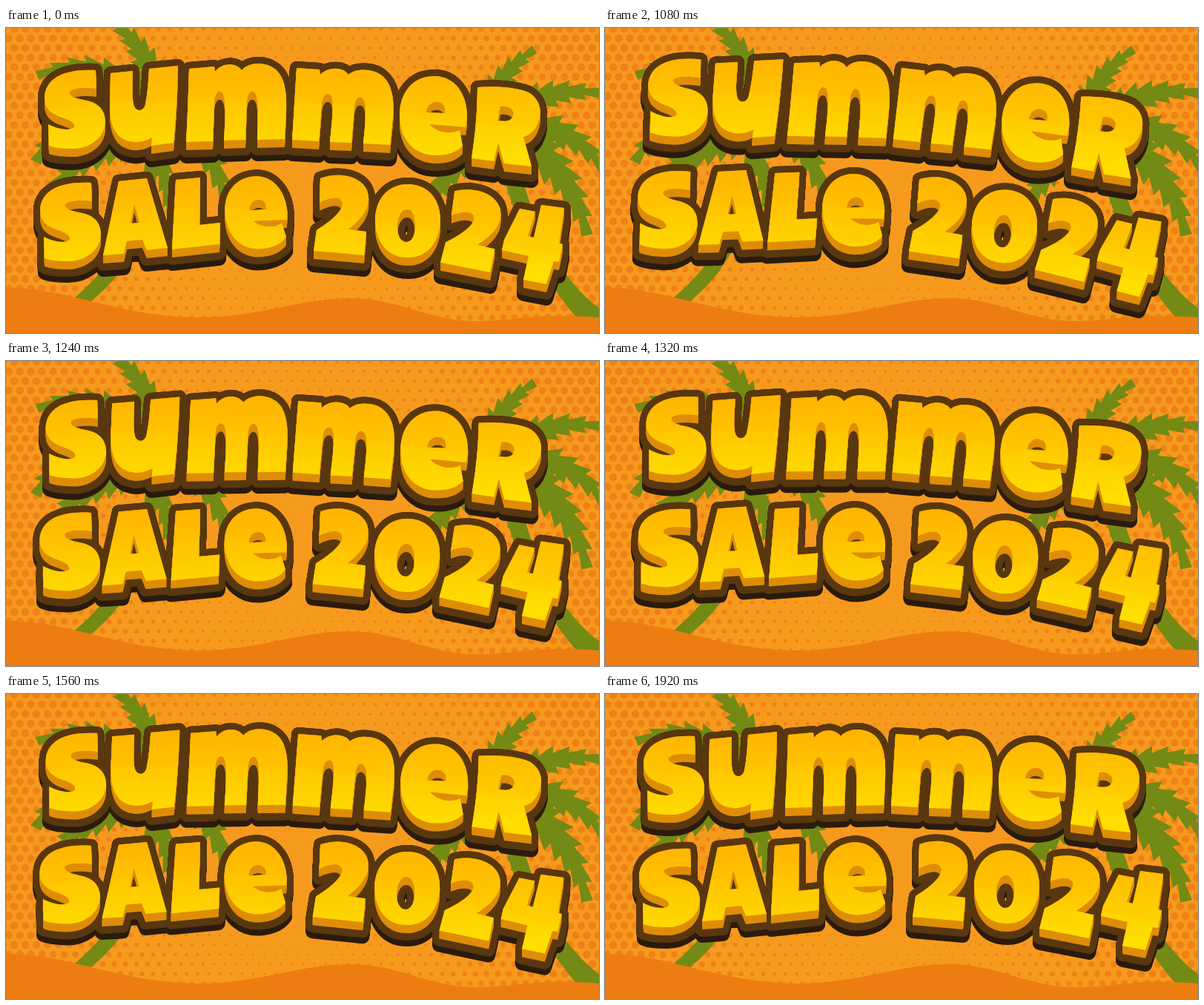
An HTML page with a canvas for the animation above (1960 ms loop, 800 by 412 pixels).

```html
<!DOCTYPE html>
<html lang="en">
<head>
<meta charset="utf-8">
<title>Summer Sale 2024</title>
<style>
html, body { margin: 0; width: 100%; height: 100%; overflow: hidden; background: #f69a1e; }
canvas { position: absolute; left: 0; top: 0; }
</style>
</head>
<body>
<canvas id="back" width="800" height="412"></canvas>
<canvas id="front" width="800" height="412" role="img" aria-label="Summer Sale 2024"></canvas>
<script>
const back = document.getElementById('back').getContext('2d');
const front = document.getElementById('front').getContext('2d');

// ---------- scenery ----------
function halftone() {
  back.fillStyle = '#f69a1e';
  back.fillRect(0, 0, 800, 412);
  back.fillStyle = '#ef8118';
  for (let row = 0; row < 34; row++) {
    for (let col = 0; col < 56; col++) {
      const x = col * 15 + (row % 2) * 7.5 - 4, y = row * 13 + 1;
      const r = (Math.hypot(x - 400, y - 206) - 70) * 0.016;
      if (r < 0.5) continue;
      back.beginPath();
      back.arc(x, y, Math.min(r, 5.4), 0, 7);
      back.fill();
    }
  }
}

// Serrated leaf along a quadratic spine
function frond(x0, y0, cx, cy, x1, y1, w) {
  const at = (t, off) => {
    const u = 1 - t;
    const dx = u * (cx - x0) + t * (x1 - cx), dy = u * (cy - y0) + t * (y1 - cy);
    const len = Math.hypot(dx, dy);
    return [u * u * x0 + 2 * u * t * cx + t * t * x1 - dy / len * off,
            u * u * y0 + 2 * u * t * cy + t * t * y1 + dx / len * off];
  };
  const edge = side => {
    const pts = [];
    for (let k = 0; k < 7; k++) {
      const t = k / 7, h = side * w * (1 - t) ** 0.7;
      pts.push(at(t, h * 0.6), at(Math.min(1, t + 0.16), h));
    }
    return pts;
  };
  back.beginPath();
  for (const p of [...edge(1), [x1, y1], ...edge(-1).reverse()]) back.lineTo(...p);
  back.fill();
}

function scenery() {
  halftone();
  back.fillStyle = '#738a14';
  [
    [205, 85, 190, 25, 138, -14, 24], [190, 100, 120, 30, 42, 64, 25],
    [190, 130, 70, 120, 40, 181, 31], [180, 145, 120, 160, 62, 215, 30],
    [200, 130, 280, 140, 296, 236, 31], [190, 130, 215, 180, 222, 262, 20],
    [650, 120, 660, 62, 713, 29, 25], [680, 125, 720, 76, 803, 88, 28],
    [680, 140, 760, 120, 807, 192, 30], [690, 150, 765, 190, 784, 280, 32],
    [650, 150, 590, 190, 566, 252, 27], [660, 160, 690, 200, 690, 250, 20]
  ].forEach(f => frond(...f));
  back.fill(new Path2D('M190,140Q190,290 84,371L112,371Q205,300 208,140Z'));
  back.fill(new Path2D('M662,160Q690,300 772,394L802,394V380Q720,320 686,160Z'));
  back.fillStyle = '#ed7d11';
  back.fill(new Path2D('M0,351C90,351 150,391 265,391C350,389 395,365 465,365C530,365 570,396 635,396C700,395 710,385 800,391V412H0Z'));
}

// ---------- lettering ----------
const S = 'M121,57L122,82C108,80 90,81 86,86C84,92 94,95 104,97C124,100 134,110 134,127C133,150 110,164 88,163C76,163 66,162 58,159L57,130C68,136 86,140 92,134C94,128 85,124 76,121C60,116 52,108 52,94C53,68 78,55 121,57Z';
const U = 'M141,61L171,58C170,80 170,98 173,106C177,114 186,112 188,103C191,88 192,72 193,55L232,51C231,90 229,125 226,155L196,159L197,148C188,153 180,155 172,154C150,152 140,135 140,105C140,90 141,75 141,61Z';
const M1 = 'M247,55L281,52L282,59C291,47 310,46 318,57C328,45 350,46 361,54C377,64 379,90 378,110L376,150L339,151C340,122 341,96 336,88C331,82 326,88 325,99L323,151L294,152C296,122 297,96 292,88C287,82 281,89 281,101L279,153L243,154C245,120 246,85 247,55Z';
const M2 = 'M392,54L423,56L424,63C434,52 455,52 462,63C472,53 498,55 508,65C522,77 524,100 522,120L518,158L482,156C485,128 487,104 482,96C476,90 471,95 470,107L466,155L437,154C440,124 443,98 438,91C433,86 427,91 426,103L422,153L386,151C388,120 390,85 392,54Z';
const E = 'M622,122C623,90 606,65 578,65C548,65 531,88 531,118C531,152 552,172 580,172C596,172 608,168 616,159L612,138C600,144 582,142 571,130L620,134ZM567,114C569,96 590,96 592,109L592,115Z';
const R = 'M636,80C660,78 690,80 705,87C722,97 724,115 717,130C712,141 705,145 698,147L709,187L672,183L664,155L658,180L628,176C633,145 636,110 636,80ZM667,106C680,104 688,112 683,121C679,127 671,126 663,125Z';
const A = 'M152,207L190,203L218,297L190,300L184,286L163,288L159,305L131,307ZM173,238L168,264L180,263Z';
const L = 'M229,205L262,202L261,266L289,263L288,292L224,299Z';
const TWO = 'M424,203C448,194 478,199 487,219C495,240 480,258 462,272L486,275L483,307L415,301L419,273C435,263 452,250 454,238C453,226 438,228 423,236Z';
const ZERO = 'M542,211C570,211 587,232 586,262C584,292 566,311 541,310C514,310 498,288 498,258C499,230 516,211 542,211ZM541,245C532,245 528,258 528,269C528,281 533,289 540,289C548,289 552,279 552,267C552,254 548,245 541,245Z';
const FOUR = 'M693,244L714,248L704,281L712,283L722,239L753,243L746,291L751,292L746,316L739,315L729,346L698,340L705,308L669,300L672,286Z';

// Copies a glyph from one centre to another, turned by deg and scaled
const moved = (d, x0, y0, x1, y1, deg, size = 1) =>
  [d, new DOMMatrix().translate(x1, y1).rotate(deg).scale(size).translate(-x0, -y0)];

function word(parts) {
  const path = new Path2D();
  for (const [d, matrix] of parts) path.addPath(new Path2D(d), matrix || new DOMMatrix());
  return path;
}

function gradient(y0, y1) {
  const g = front.createLinearGradient(0, y0, 0, y1);
  g.addColorStop(0, '#ffb400');
  g.addColorStop(1, '#ffde00');
  return g;
}

const rows = [
  {
    path: word([[S], [U], [M1], [M2], [E], [R]]),
    fill: gradient(48, 172),
    shade: new Path2D('M30,113Q330,66 760,148V0H30Z')
  },
  {
    path: word([
      moved(S, 93, 110, 87, 262, 0), [A], [L], moved(E, 577, 119, 338, 250, -7, 0.92),
      [TWO], [ZERO], moved(TWO, 452, 252, 628, 272, 6), [FOUR]
    ]),
    fill: gradient(200, 330),
    shade: new Path2D('M30,270Q330,198 790,322V180H30Z')
  }
];

function extrude(depth, draw) {
  front.save();
  for (let i = 0; i <= depth; i++) {
    draw();
    front.translate(0, 1);
  }
  front.restore();
}

function drawRow({ path, fill, shade }) {
  for (const [color, depth] of [['#2a1b0e', 20], ['#59370f', 12]]) {
    front.strokeStyle = color;
    extrude(depth, () => front.stroke(path));
  }
  front.fillStyle = '#df8d07';
  extrude(11, () => front.fill(path, 'evenodd'));
  front.fillStyle = fill;
  front.fill(path, 'evenodd');
  front.save();
  front.clip(path, 'evenodd');
  front.fillStyle = 'rgba(255,170,0,.12)';
  front.fill(shade);
  front.restore();
}

// ---------- motion ----------
const LOOP = 1960, REST = 1000, STEP = 40;
// [step, degrees]: a decaying swing
const swing = [[0, 4.87], [1, 5.2], [4, -3.5], [7.1, 2.5], [10.3, -1.6], [13.4, 0.95], [16.6, -0.5], [19.4, 0.32], [23, 0]];

function angleAt(time) {
  if (time < REST) return 0;
  const step = Math.floor((time - REST) / STEP);
  const next = Math.max(1, swing.findIndex(k => k[0] >= step));
  const [a, from] = swing[next - 1], [b, to] = swing[next];
  return from + (to - from) * (1 - Math.cos(Math.PI * (step - a) / (b - a))) / 2;
}

let shown = null;
function frame() {
  const angle = angleAt(performance.now() % LOOP);
  if (angle !== shown) {
    shown = angle;
    front.clearRect(0, 0, 800, 412);
    front.save();
    front.translate(400, 206);
    front.rotate(angle * Math.PI / 180);
    front.translate(-400, -206);
    rows.forEach(drawRow);
    front.restore();
  }
  requestAnimationFrame(frame);
}

front.lineWidth = 18;
front.lineJoin = 'round';
scenery();
frame();
</script>
</body>
</html>
```
